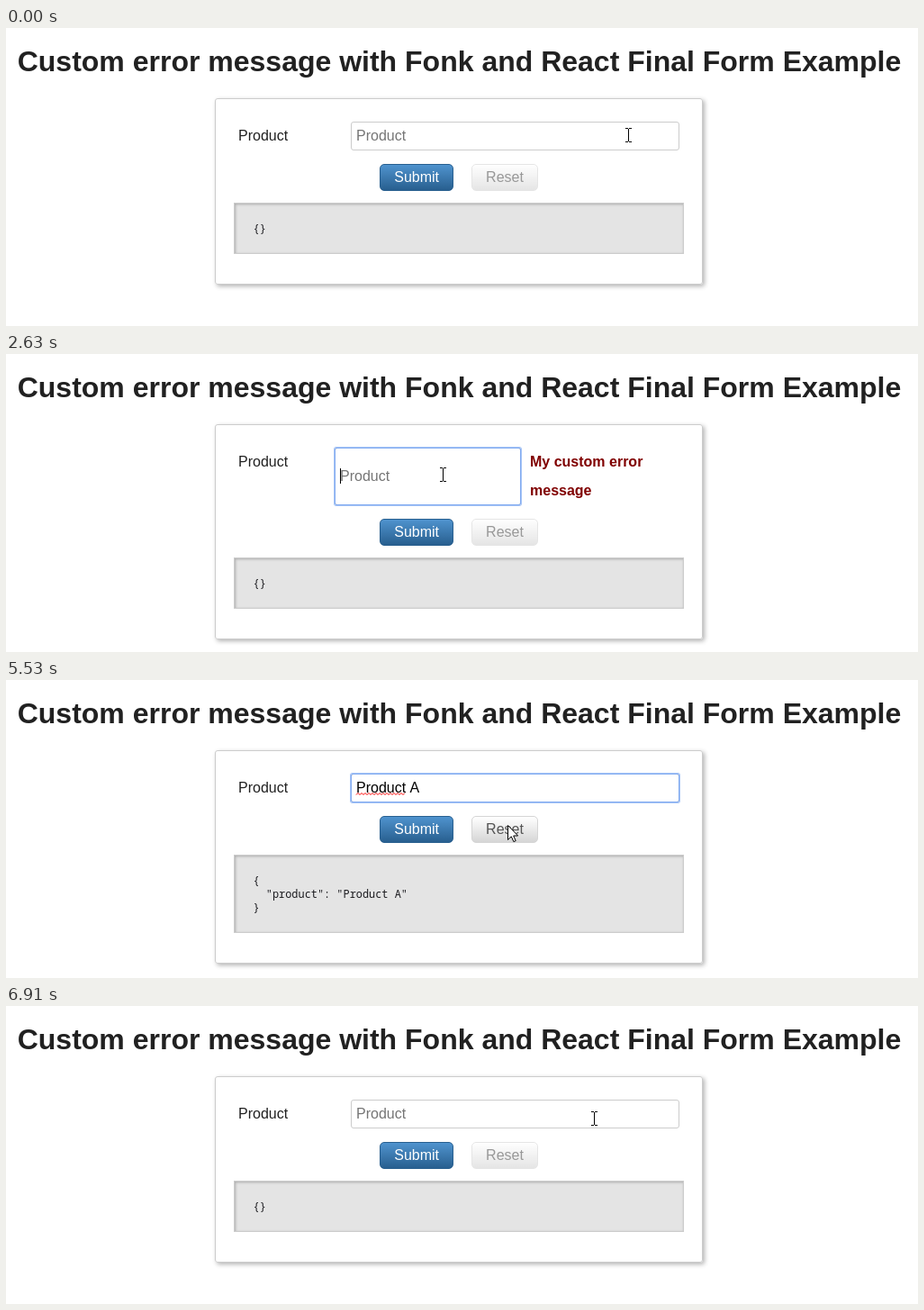
These frames come from a looping animation (1013x331 px, 7140 ms). An HTML page:

```html
<!DOCTYPE html>
<html lang="en">
<head>
<meta charset="utf-8">
<title>Custom error message</title>
<style>
* { box-sizing: border-box; }
html, body { margin: 0; width: 100%; height: 100%; overflow: hidden; background: #fff; }
body { position: relative; color: #212121; font: 16px/32px "Liberation Sans", Arial, sans-serif; font-kerning: none; }
h1, .card, .label, .field, .error, .btn, pre, .caret, .ring, svg { position: absolute; margin: 0; }
h1 { left: 3.5px; top: 19px; width: 1000px; font-size: 32px; line-height: 36px; text-align: center; white-space: nowrap; }
.card {
  left: 232px; top: 78px; width: 542px; height: 207px;
  border: 1px solid #ccc; border-radius: 3px; box-shadow: 2px 2px 5px rgba(0, 0, 0, .3);
}
.label { left: 258px; top: 104px; }
.field {
  left: 383px; top: 104px; width: 365px; height: 32px; padding-left: 5px;
  border: 1px solid #ccc; border-radius: 3px; line-height: 30px; color: #000; white-space: pre;
}
.empty .value { color: #757575; }
.caret { width: 1px; height: 17px; top: 6px; background: #000; }
.empty .caret { left: 5px; }
.ring { inset: -1px; border: 1px solid #82abf0; border-radius: 2px; box-shadow: 0 0 0 1px #a6c4f6; opacity: 0; }
.error { left: 582px; top: 104px; width: 160px; color: #800000; font-weight: bold; }
.btn {
  top: 151px; height: 30px; padding: 5px 15px; line-height: 18px;
  border: 1px solid; border-radius: 5px; white-space: nowrap;
}
.submit { left: 415.25px; color: #fff; border-color: #285f8f; background: linear-gradient(#4f93ce, #285f8f); }
.reset { left: 517.1px; color: #555; border-color: #d5d5d5; background: linear-gradient(#fff, #d5d5d5); }
.empty .reset { opacity: .6; }
pre {
  left: 253px; top: 194px; width: 500px; padding: 20px 20.5px; border: 1px solid #ccc;
  background: #e4e4e4; box-shadow: inset 1px 1px 3px rgba(0, 0, 0, .25);
  font: 11.92px/15px "Noto Sans Mono", monospace; color: #1c1c20;
}
.invalid .field { left: 365px; width: 207px; height: 64px; line-height: 62px; }
.invalid .caret { top: 22px; }
.invalid .btn { top: 183px; }
.invalid pre { top: 226px; }
svg { overflow: visible; }
.squiggle { left: 5px; top: 20px; fill: none; stroke: #f00; }
.cursor { left: 0; top: 0; }
</style>
</head>
<body>
<h1>Custom error message with Fonk and React Final Form Example</h1>
<div class="card"></div>
<div class="label">Product</div>
<div class="field"><span class="value"></span><span class="caret"></span><i class="ring"></i>
  <svg class="squiggle" width="56" height="4"><path/></svg></div>
<div class="error">My custom error message</div>
<div class="btn submit">Submit</div>
<div class="btn reset">Reset<i class="ring"></i></div>
<pre></pre>
<svg class="cursor" width="12" height="19">
  <path class="arrow" d="M.5 .5V16.5L4.3 12.9L6.9 18.6L9.2 17.6L6.7 12H11.6Z" fill="#fff" stroke="#000"/>
  <path class="beam" d="M-3 -7.5H0M1 -7.5H4M.5 -7V7M-3 7.5H0M1 7.5H4" fill="none" stroke="#000"/>
</svg>
<script>
const LOOP = 7140;
const BLINK = 520;
const focusAt = 840, blurAt = 1460, refocusAt = 2560, typeAt = 3180, wordAt = 4290,
  lastKeyAt = 4750, pressAt = 6140, resetAt = 6300;

const $ = s => document.querySelector(s);
const el = {
  value: $('.value'), caret: $('.caret'), ring: $('.field .ring'), squiggle: $('.squiggle'),
  error: $('.error'), resetRing: $('.reset .ring'), json: $('pre'), card: $('.card'),
  cursor: $('.cursor'), arrow: $('.arrow'), beam: $('.beam')
};

// Each move bends from the previous position through `via` in a few visible hops
const home = [691, 119];
const moves = [
  { start: 380, end: 610, hops: 4, via: [665, 110], to: [649, 121] },
  { start: 1080, end: 1310, hops: 4, via: [650, 145], to: [658, 169] },
  { start: 2010, end: 2240, hops: 4, via: [540, 146], to: [485, 134] },
  { start: 5130, end: 5130, hops: 1, via: [500, 110], to: [517, 92] },
  { start: 5300, end: 5610, hops: 5, via: [545, 145], to: [563, 170] },
  { start: 5760, end: 5990, hops: 4, via: [565, 164], to: [569, 158] },
  { start: 6450, end: 6910, hops: 7, via: [540, 200], to: [653, 125] }
];

const easeOut = u => 1 - (1 - u) ** 2;
const bend = (a, b, c, u) => (1 - u) ** 2 * a + 2 * u * (1 - u) * b + u * u * c;

function pointer(t) {
  let pos = home;
  for (const { start, end, hops, via, to } of moves) {
    if (t < start) break;
    const gap = (end - start) / Math.max(1, hops - 1);
    const hop = t >= end ? hops : 1 + Math.floor((t - start) / gap);
    const u = easeOut(hop / hops);
    pos = pos.map((from, i) => Math.round(bend(from, via[i], to[i], u)));
  }
  return pos;
}

// The word comes at an even pace; the final letter follows a pause
function typed(t) {
  if (t < typeAt || t >= resetAt) return '';
  if (t >= lastKeyAt) return 'Product A';
  const pace = (wordAt - typeAt) / 7;
  return 'Product '.slice(0, 1 + Math.floor((t - typeAt) / pace));
}

function state(t) {
  const focused = (t >= focusAt && t < blurAt) || (t >= refocusAt && t < pressAt);
  const focusStart = t < blurAt ? focusAt : refocusAt;
  const typing = t >= typeAt && t < lastKeyAt;
  const blinkStart = t >= lastKeyAt ? lastKeyAt : focusStart;
  return {
    pos: pointer(t),
    text: typed(t),
    invalid: t >= blurAt && t < typeAt,
    ring: !focused ? 0 : t - focusStart < 70 ? .5 : 1,
    caret: focused && (typing || (t - blinkStart) % (2 * BLINK) < BLINK),
    pressed: t >= pressAt && t < resetAt
  };
}

let wave = 'M0 2.5';
for (let x = 2; x <= 55; x += 2) wave += `L${x} ${x % 4 ? .5 : 2.5}`;
$('.squiggle path').setAttribute('d', wave);

const show = (node, on) => { node.style.display = on ? '' : 'none'; };

function overField([x, y], invalid) {
  const [left, right, bottom] = invalid ? [365, 572, 168] : [383, 748, 136];
  return x >= left && x < right && y >= 104 && y < bottom;
}

function render({ pos, text, invalid, ring, caret, pressed }) {
  const beam = overField(pos, invalid);
  document.body.className = (text ? '' : 'empty ') + (invalid ? 'invalid' : '');
  el.value.textContent = text || 'Product';
  el.json.textContent = JSON.stringify(text ? { product: text } : {}, null, 2);
  el.card.style.height = (text ? 237 : invalid ? 239 : 207) + 'px';
  el.ring.style.opacity = ring;
  el.resetRing.style.opacity = pressed ? 1 : 0;
  show(el.caret, caret);
  show(el.error, invalid);
  show(el.squiggle, ring && text.length > 7);
  show(el.arrow, !beam);
  show(el.beam, beam);
  el.cursor.style.transform = `translate(${pos[0]}px, ${pos[1]}px)`;
}

const origin = performance.now();
function tick() {
  render(state(Math.max(0, performance.now() - origin) % LOOP));
  requestAnimationFrame(tick);
}
tick();
</script>
</body>
</html>
```
